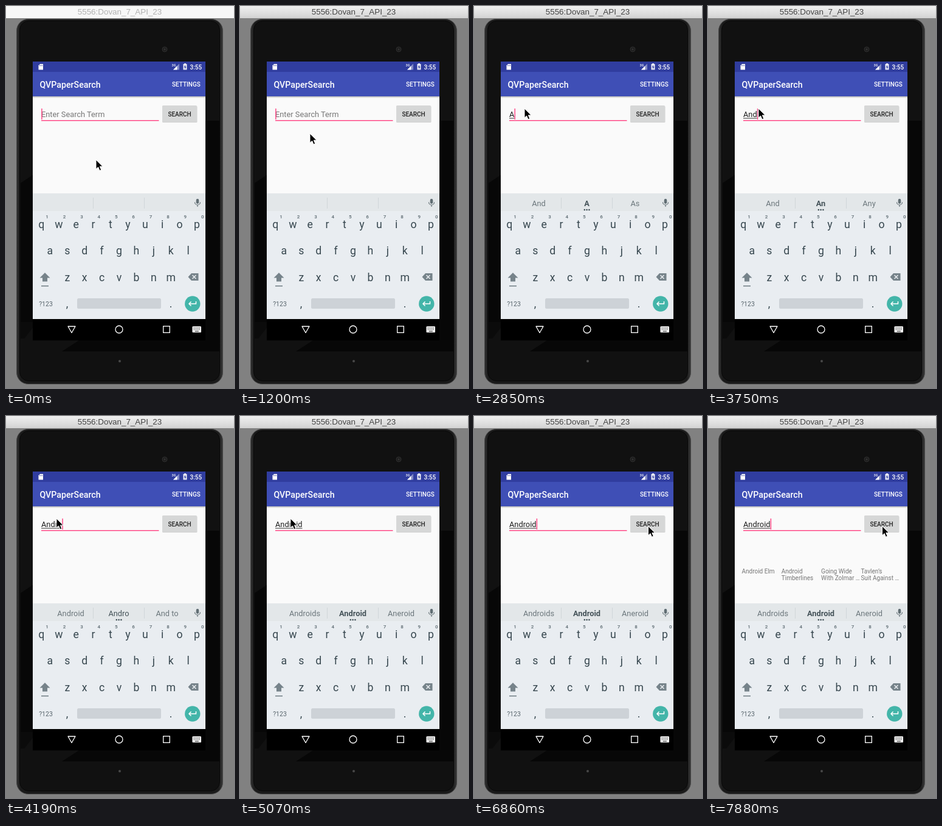
Write an HTML page that moves like this. It is 375 px wide and 626 px high and loops after 8000 ms.

```html
<!DOCTYPE html>
<html lang="en">
<head>
<meta charset="utf-8">
<title>Search demo</title>
<style>
  html, body { margin: 0; width: 100%; height: 100%; overflow: hidden; background: #818181; }
  svg { display: block; width: 375px; height: 626px; font-family: Roboto, sans-serif; }
  .mid { text-anchor: middle; }
  .med { font-weight: 500; }
  .key { font-size: 17.7px; fill: #37474f; text-anchor: middle; }
  .num { font-size: 8px; fill: #5a686f; text-anchor: middle; }
  .sug { font-size: 12.8px; fill: #6c777c; text-anchor: middle; }
  .hit { font-size: 10px; fill: #757575; }
</style>
</head>
<body>
<svg viewBox="0 0 375 626" xmlns="http://www.w3.org/2000/svg">
  <defs>
    <linearGradient id="bar" x2="0" y2="1">
      <stop offset="0" stop-color="#f0f0f0"/><stop offset="1" stop-color="#d2d2d2"/>
    </linearGradient>
    <linearGradient id="shade" x2="0" y2="1">
      <stop offset="0" stop-color="#000" stop-opacity=".28"/><stop offset="1" stop-color="#000" stop-opacity="0"/>
    </linearGradient>
    <linearGradient id="rim">
      <stop offset="0" stop-color="#303030"/><stop offset=".02" stop-color="#1a1a1a"/>
      <stop offset=".98" stop-color="#1a1a1a"/><stop offset="1" stop-color="#383838"/>
    </linearGradient>
  </defs>

  <rect width="375" height="626" fill="#818181"/>
  <rect id="titleBar" width="375" height="20"/>
  <text id="title" class="mid" x="187" y="14.3" font-size="13.4" font-family="Liberation Sans, Arial, sans-serif">5556:Dovan_7_API_23</text>

  <!-- device -->
  <rect x="17.5" y="21.5" width="339" height="598" rx="19" fill="url(#rim)" stroke="#4a4a4a"/>
  <rect x="22.5" y="24.5" width="329" height="590" rx="15" fill="#111" stroke="#080808"/>
  <path d="M24 290L44 277V518H24ZM328 188H351V566H92L120 548H328Z" fill="#070707"/>
  <path d="M24 518H44V527L30 545H24Z" fill="#0b0b0b"/>
  <circle cx="261" cy="71" r="4" fill="#1c1c1c" stroke="#303030"/>
  <circle cx="261" cy="71" r="1.5" fill="#333"/>
  <circle cx="187" cy="582" r="2" fill="#484848"/>

  <!-- app -->
  <rect x="44" y="91" width="284" height="457" fill="#000"/>
  <rect x="44" y="148" width="284" height="160" fill="#fafafa"/>
  <rect x="44" y="91" width="284" height="17" fill="#303d9f"/>
  <rect x="44" y="108" width="284" height="40" fill="#3f4fb6"/>
  <rect x="44" y="148" width="284" height="3" fill="url(#shade)"/>
  <g fill="#fff">
    <path d="M56 95H61V104.500H53.500V97.500Z"/>
    <path d="M55.500 98.500v-2M57.500 98.500v-2M59.500 98.500v-2" stroke="#303d9f" stroke-width=".8"/>
    <text x="272.500" y="99" font-size="5.5" class="med">3G</text>
    <path d="M285 94.500V104.500H275Z" opacity=".4"/>
    <path d="M281.500 98V104.500H275Z"/>
    <path d="M293 95v-1h3v1h1.500v9.500h-6V95Z" opacity=".9"/>
    <path d="M295 96.500l-2.200 4h1.500v3l2.200-4H295Z" fill="#303d9f"/>
    <text x="302.500" y="103.500" font-size="10" class="med">3:55</text>
    <text x="55.500" y="133.800" font-size="14.2" class="med">QVPaperSearch</text>
    <text x="273" y="132" font-size="10" class="med">SETTINGS</text>
  </g>
  <rect x="257" y="164" width="57.500" height="27" rx="1.500" fill="#000" opacity=".16"/>
  <rect x="257" y="163" width="57" height="27" rx="1.500" fill="#d6d7d7"/>
  <text class="mid med" x="285.500" y="180.500" font-size="10" fill="#222">SEARCH</text>
  <rect x="58" y="187" width="193.500" height="1.400" fill="#ff4081"/>
  <text id="hint" x="58" y="182" font-size="12.8" fill="#777">Enter Search Term</text>
  <text id="typed" x="58" y="182" font-size="12.8" fill="#212121"></text>
  <rect id="under" x="58" y="183.500" height="1" fill="#333"/>
  <rect id="caret" y="168" width="1.400" height="18" fill="#ff4081"/>
  <g id="hits"></g>

  <!-- keyboard -->
  <rect x="44" y="307" width="284" height="30" fill="#e3e7e9"/>
  <rect x="44" y="336" width="284" height="177" fill="#e9edf1"/>
  <path d="M143.500 314v18M227.500 314v18" stroke="#d0d6d9"/>
  <g id="sugs"></g>
  <g id="dots" fill="#37474f">
    <circle cx="181.800" cy="334" r="1.200"/><circle cx="185.600" cy="334" r="1.200"/><circle cx="189.400" cy="334" r="1.200"/>
  </g>
  <g fill="none" stroke="#606d73" stroke-width="1.200">
    <rect x="313.300" y="316.500" width="3.400" height="7" rx="1.700" fill="#606d73"/>
    <path d="M310.500 321.500a4.500 4.500 0 0 0 9 0M315 326v3"/>
  </g>
  <g id="keys"></g>
  <g fill="#76838a">
    <path d="M64 437l8.500 8.500h-4.500v6h-8v-6h-4.500Z"/>
    <rect x="58" y="458" width="12" height="1.600"/>
    <path d="M305 438H316.500V450H305L299.500 444Z"/>
  </g>
  <path d="M306.500 441l6 6M312.500 441l-6 6" stroke="#e9edf1" stroke-width="1.500"/>
  <text class="mid" x="65.500" y="492" font-size="10.500" fill="#59666d">?123</text>
  <rect x="117" y="479" width="138" height="17" rx="2.500" fill="#cdd2d7"/>
  <circle cx="306.800" cy="488" r="12.700" fill="#43b5a9"/>
  <path d="M312.500 484v4H301M304.500 484.500l-3.500 3.500 3.500 3.500" fill="none" stroke="#fff" stroke-width="1.500"/>

  <!-- navigation -->
  <g fill="none" stroke="#fff" stroke-width="1.300">
    <path d="M102 525H114L108 535.500Z" stroke-linejoin="round"/>
    <circle cx="186" cy="530" r="6"/>
    <rect x="258.700" y="524.700" width="10.600" height="10.600"/>
  </g>
  <rect x="306.500" y="525" width="14.500" height="10" rx="1" fill="#fff"/>
  <path d="M308.500 527.500h11M308.500 530h11" stroke="#000" stroke-width="1.200" stroke-dasharray="1.300 1"/>
  <path d="M310.500 533h6.500" stroke="#000"/>

  <path id="mouse" d="M0 0V15.300L3.600 12L6 17.700L8.700 16.500L6.300 11H11.200Z" fill="#000" stroke="#fff" stroke-width="1"/>
</svg>
<script>
const LOOP = 8000;
const $ = id => document.getElementById(id);

function addText(parent, cls, x, y, str) {
  const el = document.createElementNS("http://www.w3.org/2000/svg", "text");
  el.setAttribute("class", cls);
  el.setAttribute("x", x);
  el.setAttribute("y", y);
  el.textContent = str;
  parent.append(el);
  return el;
}

const PITCH = 28.4;
[["qwertyuiop", 58.4, 364], ["asdfghjkl", 72.4, 407], ["zxcvbnm", 100.8, 450.5]].forEach(([row, x, y]) =>
  [...row].forEach((ch, i) => addText($("keys"), "key", x + i * PITCH, y, ch)));
[..."1234567890"].forEach((ch, i) => addText($("keys"), "num med", 67.6 + i * PITCH, 348, ch));
addText($("keys"), "key", 100.5, 494, ",");
addText($("keys"), "key", 271, 494, ".");

const sugs = [106.5, 185.5, 265].map(x => addText($("sugs"), "sug", x, 327.7, ""));
sugs[1].style.fill = "#455359";

[["Android Elm"], ["Android", "Timberlines"], ["Going Wide", "With Zolmar …"], ["Tavlen’s", "Suit Against …"]]
  .forEach((lines, col) => lines.forEach((str, i) =>
    addText($("hits"), "hit", 55.5 + col * 65.3, 258 + i * 11, str)));

// Each track lists [start time, ...values]; a value holds until the next start.
const caretTrack = [[0, 1], [600, 0], [1200, 1], [1650, 0], [2100, 1], [2550, 0], [2700, 1], [3300, 0],
  [3450, 1], [5070, 0], [5520, 1], [6120, 0], [6560, 1], [7150, 0], [7590, 1]];
const typeTrack = [[0, ""], [2700, "A"], [3450, "An"], [3750, "And"], [3890, "Andr"], [4040, "Andro"],
  [4330, "Androi"], [4630, "Android"]];
const sugTrack = [[0, "", "", ""], [2850, "And", "A", "As"], [3600, "And", "An", "Any"],
  [3890, "Android", "And", "Andy"], [4040, "Android", "Andr", "Andrew"], [4190, "Android", "Andro", "And to"],
  [4480, "Android", "Androi", "Androids"], [4630, "Androids", "Android", "Aneroid"]];
const mouseTrack = [[0, 148, 252], [1050, 140, 243], [1200, 115, 209], [1350, 93, 180], [1500, 85, 170],
  [1650, 83, 168], [5520, 100, 300], [5670, 139, 489], [5820, 158.5, 447], [5970, 207, 320],
  [6120, 282, 150], [6270, 313, 93], [6420, 301, 142], [6560, 287, 182], [6710, 286.5, 180.5]];
const words = ["A", "An", "And", "Android"];

const at = (track, t) => track.findLast(k => k[0] <= t).slice(1);
const show = (id, on) => $(id).setAttribute("visibility", on ? "visible" : "hidden");

function draw(t) {
  const active = t >= 900;
  $("titleBar").setAttribute("fill", active ? "url(#bar)" : "#f7f7f7");
  $("title").setAttribute("fill", active ? "#444" : "#b2b2b2");

  const [str] = at(typeTrack, t);
  $("typed").textContent = str;
  const width = str ? $("typed").getComputedTextLength() : 0;
  $("under").setAttribute("width", width);
  $("caret").setAttribute("x", 58.2 + width);
  show("hint", !str);
  show("caret", at(caretTrack, t)[0]);

  const names = at(sugTrack, t);
  sugs.forEach((el, i) => el.textContent = names[i]);
  sugs[1].style.fontWeight = words.includes(names[1]) ? 700 : 400;
  show("dots", names[1]);
  show("hits", t >= 7880);

  $("mouse").setAttribute("transform", `translate(${at(mouseTrack, t)})`);
}

const start = performance.now();
function tick() {
  draw((performance.now() - start) % LOOP);
  requestAnimationFrame(tick);
}
tick();
</script>
</body>
</html>
```
